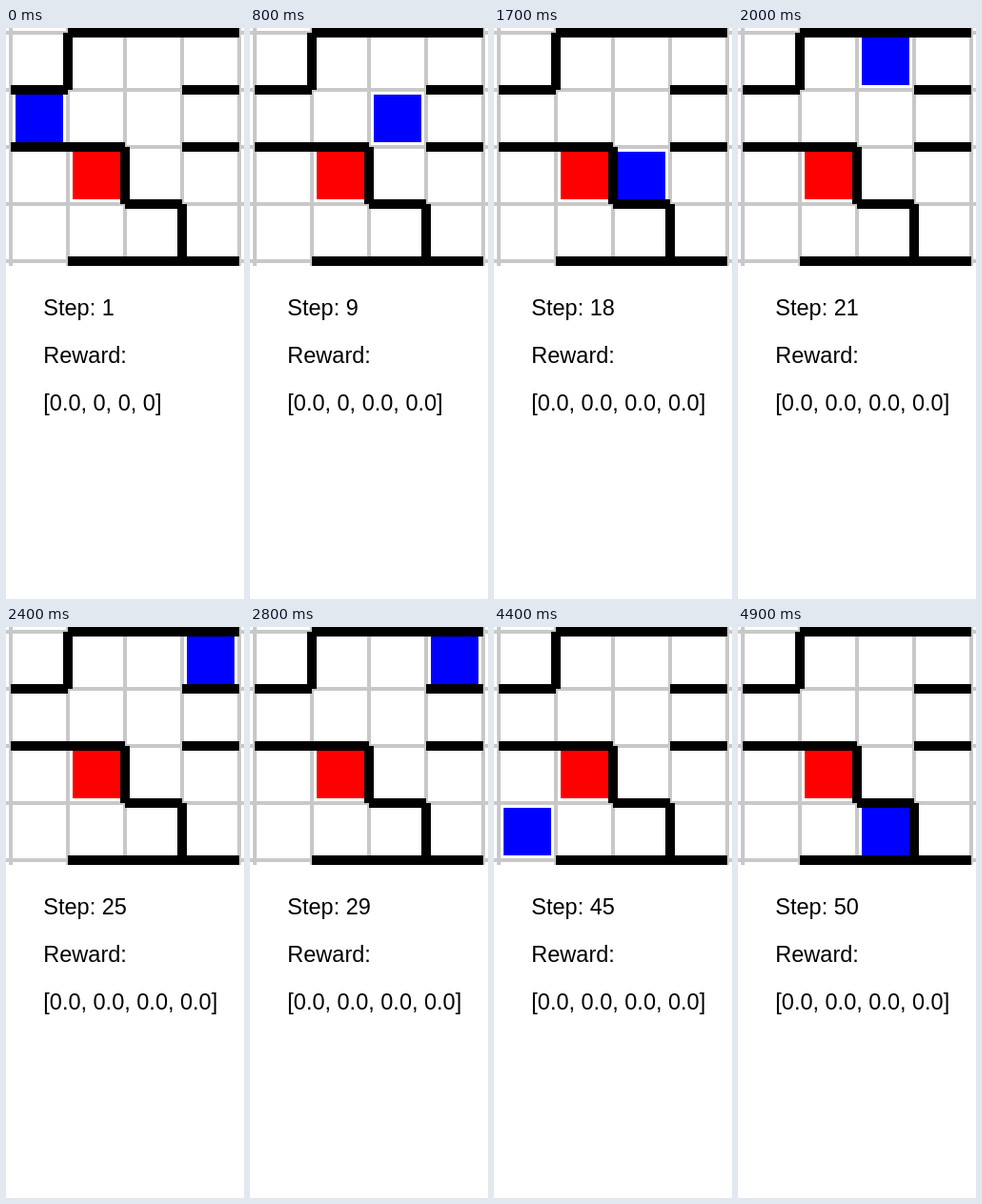
An HTML page that plays this animation: 250 px wide and 600 px high, repeating every 5 s.

```html
<!DOCTYPE html>
<html lang="en">
<head>
<meta charset="utf-8">
<title>Grid walk</title>
<style>
  html, body { margin: 0; width: 100%; height: 100%; overflow: hidden; background: #fff; }
  svg { display: block; }
  text { font: 23.5px "Liberation Sans", Arial, sans-serif; font-kerning: none; white-space: pre; }
</style>
</head>
<body>
<svg width="250" height="600" viewBox="0 0 250 600">
  <path id="grid" stroke="#c8c8c8" stroke-width="4"/>
  <rect x="70" y="130" width="50" height="50" fill="#f00"/>
  <rect id="agent" width="50" height="50" fill="#00f"/>
  <path id="walls" stroke="#000" stroke-width="10"/>
  <text id="step" x="39.3" y="302"></text>
  <text x="39.3" y="352">Reward:</text>
  <text id="reward" x="39.3" y="402"></text>
</svg>
<script>
const STEP_MS = 100, CELL = 60, EDGE = 5, SIZE = 4;
const $ = id => document.getElementById(id);
const at = n => EDGE + n * CELL;
const wrap = n => (n + SIZE) % SIZE;

// "#" marks a wall on the top or left side of a cell; the grid wraps around.
const topWalls = [".###", "#..#", "##.#", "..#."];
const leftWalls = [".#..", "....", "..#.", "...#"];
const hasWall = (map, col, row) => map[wrap(row)][wrap(col)] === "#";

// Directions in the order of the reward entries.
const moves = {
  U: { dx: 0, dy: -1, blocked: (c, r) => hasWall(topWalls, c, r) },
  R: { dx: 1, dy: 0, blocked: (c, r) => hasWall(leftWalls, c + 1, r) },
  D: { dx: 0, dy: 1, blocked: (c, r) => hasWall(topWalls, c, r + 1) },
  L: { dx: -1, dy: 0, blocked: (c, r) => hasWall(leftWalls, c, r) }
};

// A direction and how often it is tried; walls stop the agent.
const plan = "U D2 L D4 L U D2 R L D5 U2 R U8 R D2 U L D9 R3 U L R";
const actions = plan.split(" ").map(run => run[0].repeat(run[1] || 1)).join("");

function walk(count) {
  let col = 0, row = 1;
  for (const name of actions.slice(0, count)) {
    const move = moves[name];
    if (move.blocked(col, row)) continue;
    col = wrap(col + move.dx);
    row = wrap(row + move.dy);
  }
  return { col, row };
}

function drawBoard() {
  let grid = "", walls = "";
  for (let a = 0; a <= SIZE; a++) {
    grid += `M${at(a)} 0V250M0 ${at(a)}H250`;
    for (let b = 0; b < SIZE; b++) {
      if (hasWall(topWalls, b, a)) walls += `M${at(b)} ${at(a)}h${CELL}`;
      if (hasWall(leftWalls, a, b)) walls += `M${at(a)} ${at(b)}v${CELL}`;
    }
  }
  $("grid").setAttribute("d", grid);
  $("walls").setAttribute("d", walls);
}

function draw(ms) {
  const step = Math.floor(ms / STEP_MS) % actions.length + 1;
  const { col, row } = walk(step);
  const tried = actions.slice(0, step);
  const rewards = Object.keys(moves).map(name => tried.includes(name) ? "0.0" : "0");
  $("agent").setAttribute("x", at(col) + EDGE);
  $("agent").setAttribute("y", at(row) + EDGE);
  $("step").textContent = `Step: ${step}`;
  $("reward").textContent = `[${rewards.join(", ")}]`;
}

const start = performance.now();
function tick() {
  draw(performance.now() - start);
  requestAnimationFrame(tick);
}
drawBoard();
draw(0);
requestAnimationFrame(tick);
</script>
</body>
</html>
```
